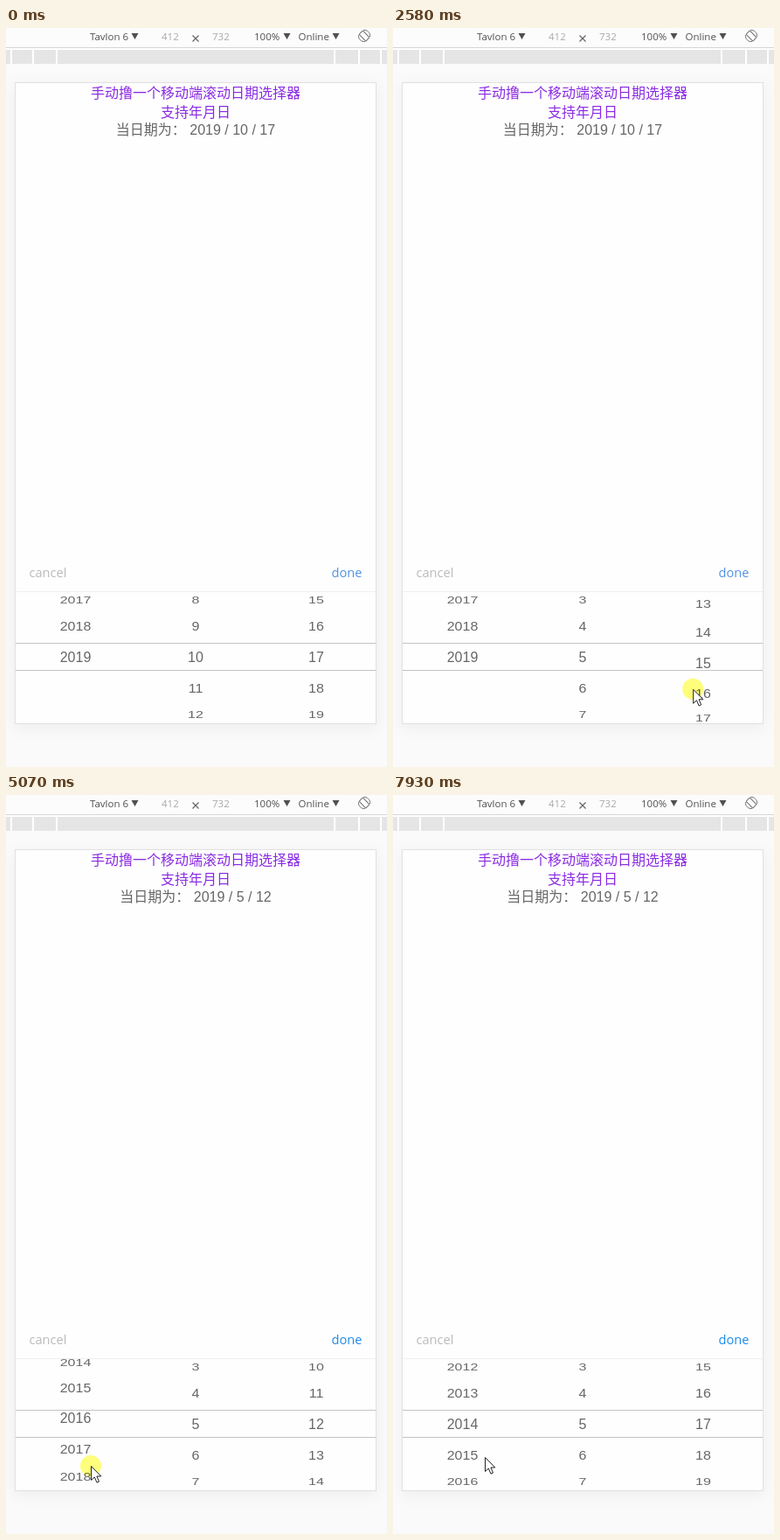
An HTML page that plays this animation: 436 px wide and 845 px high, repeating every 8 s.

```html
<!DOCTYPE html>
<html lang="zh-CN">
<head>
<meta charset="utf-8">
<title>Date picker</title>
<style>
html, body { margin: 0; width: 100%; height: 100%; overflow: hidden; background: #fafafa; }
svg { display: block; width: 100vw; height: 100vh; }
.bar { font: 11.5px "Open Sans", "Noto Sans", sans-serif; fill: #505050; }
.dim { fill: #a9a9a9; }
.page { font: 16px "Liberation Sans", "Noto Sans CJK SC", "Noto Sans CJK", sans-serif; fill: #666; text-anchor: middle; }
.title { fill: #8a2be2; }
.btn { font: 14.6px "Open Sans", "Noto Sans", sans-serif; }
.phone { filter: drop-shadow(0 4px 8px rgba(0, 0, 0, .05)); }
#halo { mix-blend-mode: multiply; }
</style>
</head>
<body>
<svg viewBox="0 0 436 845">
  <defs><clipPath id="window"><rect x="11" y="645" width="412" height="150.5"/></clipPath></defs>
  <rect width="436" height="845" fill="#fafafa"/>

  <g class="bar">
    <rect width="436" height="23" fill="#fcfcfc"/>
    <rect y="22" width="436" height="1" fill="#d4d4d4"/>
    <rect y="23" width="436" height="18" fill="#fff"/>
    <rect y="25" width="436" height="16" fill="#e5e5e5"/>
    <path d="M6 25v16M31 25v16M58 25v16M376 25v16M404 25v16M429 25v16" stroke="#fff" stroke-width="2"/>
    <text x="96" y="14">Tavlon 6</text>
    <text class="dim" x="178" y="14">412</text>
    <path d="M213.500 8.500l7 7m0-7l-7 7" stroke="#666" stroke-width="1.200"/>
    <text class="dim" x="236" y="14">732</text>
    <text x="284" y="14">100%</text>
    <text x="334.500" y="14">Online</text>
    <path d="M143.500 6h8l-4 7zM317.500 6h8l-4 7zM373.500 6h8l-4 7z"/>
    <g fill="none" stroke="#707070" transform="translate(410 9)">
      <rect x="-3" y="-5.500" width="6" height="11" rx="1" transform="rotate(-45)"/>
      <path d="M-1 -6.500A6.500 6.500 0 0 1 6.500 1M1 6.500A6.500 6.500 0 0 1 -6.500 -1"/>
    </g>
  </g>

  <rect class="phone" x="10.500" y="62.500" width="413" height="733" fill="#fefefe" stroke="#e1e1e1"/>
  <g class="page">
    <text class="title" x="217" y="80">手动撸一个移动端滚动日期选择器</text>
    <text class="title" x="217" y="101.500">支持年月日</text>
    <text id="date" x="217" y="122"></text>
  </g>
  <text class="btn" x="26.500" y="628" fill="#bbb">cancel</text>
  <text class="btn" id="done" x="407.500" y="628" text-anchor="end">done</text>
  <path d="M11 644.500h412" stroke="#f0f0f0"/>
  <g class="page" id="wheels" clip-path="url(#window)"></g>
  <path d="M11 703.500h412M11 734.500h412" stroke="#c4c4c6"/>

  <circle id="halo" r="12" fill="#ffff7c"/>
  <path id="cursor" d="M.5 .5V16.500L4.300 13L7 19.200L9.500 18.100L6.900 12H11.800Z" fill="#fff" stroke="#222"/>
</svg>
<script>
const LOOP = 8000, STEP = 22 * Math.PI / 180, RADIUS = 94, MID = 719.3;
const ITEM = 31, SETTLE = 250; // px dragged per item, ms to come to rest
const $ = id => document.getElementById(id);
const ease = p => { p = Math.min(1, Math.max(0, p)); return p * p * (3 - 2 * p); };

const years = { x: 79.5, min: 1990, max: 2019, first: 2019 };
const months = { x: 217, min: 1, max: 12, first: 10 };
const days = { x: 355, min: 1, max: 31, first: 17 };
const wheels = [years, months, days];

// Pointer moves: start, end, destination
const home = { x: 298, y: 784 };
const moves = [
  [430, 510, 306, 772], [740, 1130, 352, 665], [1130, 1490, 217, 685],
  [1570, 1880, 238, 829], [1970, 2350, 335, 688], [2430, 2740, 352, 829],
  [2810, 3120, 372, 590], [3270, 3730, 395, 619], [4140, 4520, 90, 656],
  [4690, 4760, 98, 680], [4910, 5070, 97, 767], [5300, 6070, 101, 695],
  [6220, 6300, 104, 691], [6300, 6840, 102, 762], [7690, 7930, 105, 757]
];

// Each press drags its wheel, which then settles on a value
const tap = { down: 3900, up: 3965 };
const presses = [
  { wheel: months, down: 1570, up: 1970, to: 5 },
  { wheel: days, down: 2430, up: 2810, to: 12 },
  tap,
  { wheel: years, down: 4900, up: 5250, to: 2016 },
  { wheel: days, down: 5380, up: 5380, to: 17 }, // reset by the new year
  { wheel: years, down: 6300, up: 7690, to: 2014 }
];

for (const w of wheels) {
  w.labels = Array.from({ length: 9 }, () => {
    const label = document.createElementNS("http://www.w3.org/2000/svg", "text");
    label.setAttribute("y", 5.7);
    return $("wheels").appendChild(label);
  });
}

function pointer(t) {
  let { x, y } = home;
  for (const [start, end, toX, toY] of moves) {
    const p = ease((t - start) / (end - start));
    x += (toX - x) * p;
    y += (toY - y) * p;
  }
  return { x, y };
}

function position(wheel, t) {
  let pos = wheel.first;
  for (const { down, up, to } of presses.filter(p => p.wheel === wheel && t >= p.down)) {
    pos += (pointer(down).y - pointer(Math.min(t, up)).y) / ITEM;
    pos += (to - pos) * ease((t - up) / SETTLE);
  }
  return pos;
}

function turn(w, pos) {
  w.labels.forEach((label, i) => {
    const n = Math.round(pos) + i - 4, angle = (n - pos) * STEP;
    const shown = n >= w.min && n <= w.max && Math.abs(angle) < 1.5;
    label.style.display = shown ? "" : "none";
    if (!shown) return;
    label.textContent = n;
    label.setAttribute("transform",
      `translate(${w.x} ${MID + RADIUS * Math.sin(angle)}) scale(1 ${Math.cos(angle)})`);
  });
}

function draw(t) {
  const picked = t >= tap.up;
  $("date").textContent = "当日期为： " + (picked ? "2019 / 5 / 12" : "2019 / 10 / 17");
  $("done").setAttribute("fill", picked ? "#1e8bec" : "#5293e2");
  for (const w of wheels) turn(w, position(w, t));

  const { x, y } = pointer(t);
  const pressed = presses.some(p => t >= p.down && t < p.up);
  for (const id of ["cursor", "halo"]) $(id).setAttribute("transform", `translate(${x} ${y})`);
  $("cursor").style.display = t < moves[0][0] ? "none" : "";
  $("halo").style.display = pressed ? "" : "none";
}

const began = performance.now();
function tick() {
  draw((performance.now() - began) % LOOP);
  requestAnimationFrame(tick);
}
tick();
</script>
</body>
</html>
```
